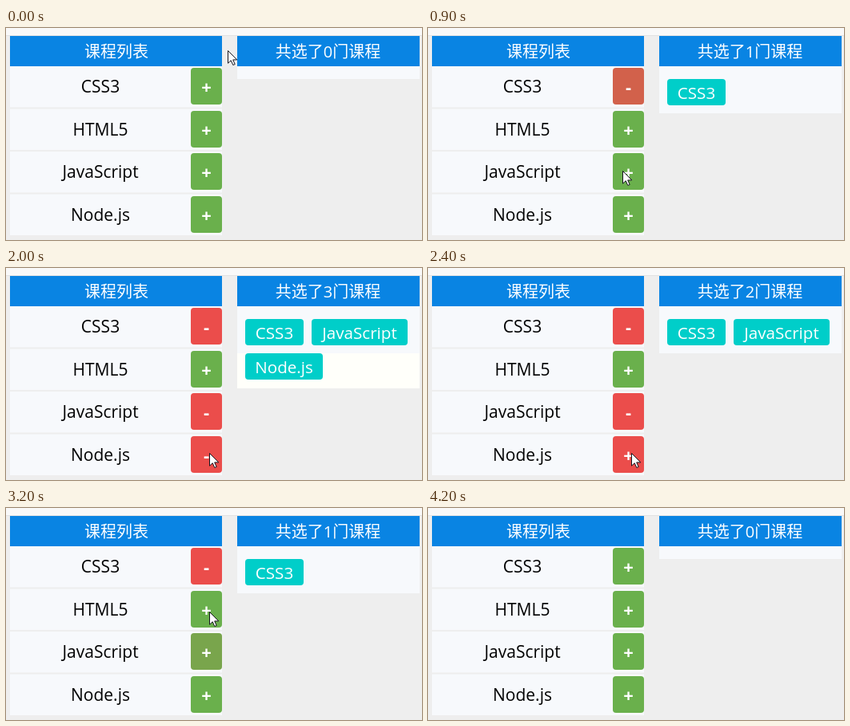
These frames come from a looping animation (520x266 px, 4.6 s). An HTML page:

```html
<!DOCTYPE html>
<html lang="zh-CN">
<head>
<meta charset="utf-8">
<title>课程列表</title>
<style>
  html, body { margin: 0; width: 100%; height: 100%; overflow: hidden; background: #eee; }
  svg { display: block; width: 520px; height: 266px; }
  text { font: 21px "Open Sans", "Noto Sans", "Noto Sans CJK SC", sans-serif; text-anchor: middle; }
  .head { font-size: 20px; font-weight: 500; fill: #fff; }
  .sign { font-size: 22px; font-weight: 700; fill: #fff; }
  .tag rect { fill: #00cec9; }
  .tag text { font-size: 20.6px; font-weight: 500; fill: #fff; }
</style>
</head>
<body>
<svg id="stage" viewBox="0 0 520 266">
  <rect width="520" height="9" fill="#f9f9f9"/>
  <rect y="9" width="520" height="1" fill="#e2e2e2"/>
  <rect x="5" y="10" width="265" height="38" fill="#0984e3"/>
  <text class="head" x="138" y="36.5">课程列表</text>
  <rect x="289" y="10" width="228" height="38" fill="#0984e3"/>
  <text class="head" id="total" x="402.5" y="36.5"></text>
  <rect id="panel" x="289" y="48" width="228" fill="#f7f9fc"/>
  <rect id="extra" x="289" y="107" width="228" height="44" fill="#fffffa"/>
  <g id="rows"></g>
  <g id="tags"></g>
  <path id="cursor" d="M.5 .5V16.2L4.2 12.7L6.8 18.5L9.2 17.5L6.7 11.9H11.8Z"
        fill="#fff" stroke="#15151f" stroke-width="1"/>
</svg>
<script>
const LOOP = 4600, TICK = 100, FADE = 500;
const GREEN = [106, 176, 76], RED = [235, 77, 75];

// Each toggle: [time the label flips, time the colour fade starts]
const courses = [
  { name: 'CSS3', tagWidth: 73, toggles: [[600, 650], [3500, 3555]] },
  { name: 'HTML5', tagWidth: 93, toggles: [] },
  { name: 'JavaScript', tagWidth: 120, toggles: [[1000, 910], [2900, 2900]] },
  { name: 'Node.js', tagWidth: 97, toggles: [[1500, 1430], [2400, 2500]] }
];

// Pointer path: time, x, y
const path = [
  [0, 277, 28], [200, 263, 56], [400, 248, 78], [600, 239, 96],
  [800, 242, 163], [900, 243, 179], [1000, 243, 181], [1200, 252, 227],
  [1300, 254, 232], [2500, 254, 232], [2700, 256, 195], [2800, 256, 186],
  [3000, 256, 186], [3200, 254, 130], [3400, 251, 82], [3500, 252, 75],
  [3700, 291, 64], [3800, 340, 78], [4000, 452, 108], [4100, 485, 98]
];

const $ = id => document.getElementById(id);

function add(parent, tag, attrs, text = '') {
  const el = document.createElementNS(parent.namespaceURI, tag);
  for (const key in attrs) el.setAttribute(key, attrs[key]);
  el.textContent = text;
  return parent.appendChild(el);
}

function set(el, attrs) {
  for (const key in attrs) el.setAttribute(key, attrs[key]);
}

courses.forEach((course, i) => {
  const y = i * 53.5, top = Math.round(50 + y), rows = $('rows');
  add(rows, 'rect', { x: 5, y: 48 + y, width: 265, height: 51.5, fill: '#f7f9fc' });
  add(rows, 'text', { x: 118, y: top + 31 }, course.name);
  course.button = add(rows, 'rect', { x: 231, y: top, width: 39, height: 46, rx: 4 });
  course.sign = add(rows, 'text', { class: 'sign', x: 250.5, y: top + 32 });
  course.tag = add($('tags'), 'g', { class: 'tag' });
  add(course.tag, 'rect', { width: course.tagWidth, height: 33, rx: 4 });
  add(course.tag, 'text', { x: course.tagWidth / 2, y: 25 }, course.name);
});

// The standard CSS "ease" curve
function ease(x) {
  if (x <= 0 || x >= 1) return x <= 0 ? 0 : 1;
  const bezier = (a, b, s) => 3 * a * s * (1 - s) ** 2 + 3 * b * s * s * (1 - s) + s ** 3;
  let low = 0, high = 1;
  for (let i = 0; i < 20; i++) {
    const mid = (low + high) / 2;
    if (bezier(.25, .25, mid) < x) low = mid; else high = mid;
  }
  return bezier(.1, 1, low);
}

function pointerAt(t) {
  const next = path.findIndex(p => p[0] > t);
  if (next < 0) return path[path.length - 1].slice(1);
  const [t0, x0, y0] = path[next - 1], [t1, x1, y1] = path[next];
  const k = (t - t0) / (t1 - t0);
  return [Math.round(x0 + (x1 - x0) * k), Math.round(y0 + (y1 - y0) * k)];
}

function draw(t) {
  let count = 0, x = 299, y = 64;
  for (const { toggles, button, sign, tag, tagWidth } of courses) {
    const chosen = toggles.filter(([flip]) => t >= flip).length % 2 === 1;
    const red = toggles.reduce((sum, [, start], i) =>
      sum + (i % 2 ? -1 : 1) * ease((t - start) / FADE), 0);
    const rgb = GREEN.map((g, i) => Math.round(g + (RED[i] - g) * red));
    set(button, { fill: `rgb(${rgb})` });
    sign.textContent = chosen ? '-' : '+';
    set(tag, { visibility: chosen ? 'visible' : 'hidden' });
    if (!chosen) continue;
    if (x + tagWidth > 507) { x = 299; y += 43; }
    set(tag, { transform: `translate(${x} ${y})` });
    x += tagWidth + 10;
    count++;
  }
  $('total').textContent = `共选了${count}门课程`;
  set($('panel'), { height: count ? 59 : 16 });
  set($('extra'), { visibility: y > 64 ? 'visible' : 'hidden' });
  set($('cursor'), {
    transform: `translate(${pointerAt(t)})`,
    visibility: t < 4200 ? 'visible' : 'hidden'
  });
}

const began = performance.now();
function frame() {
  const t = (performance.now() - began) % LOOP;
  draw(Math.floor(t / TICK) * TICK);
  requestAnimationFrame(frame);
}
frame();
</script>
</body>
</html>
```
